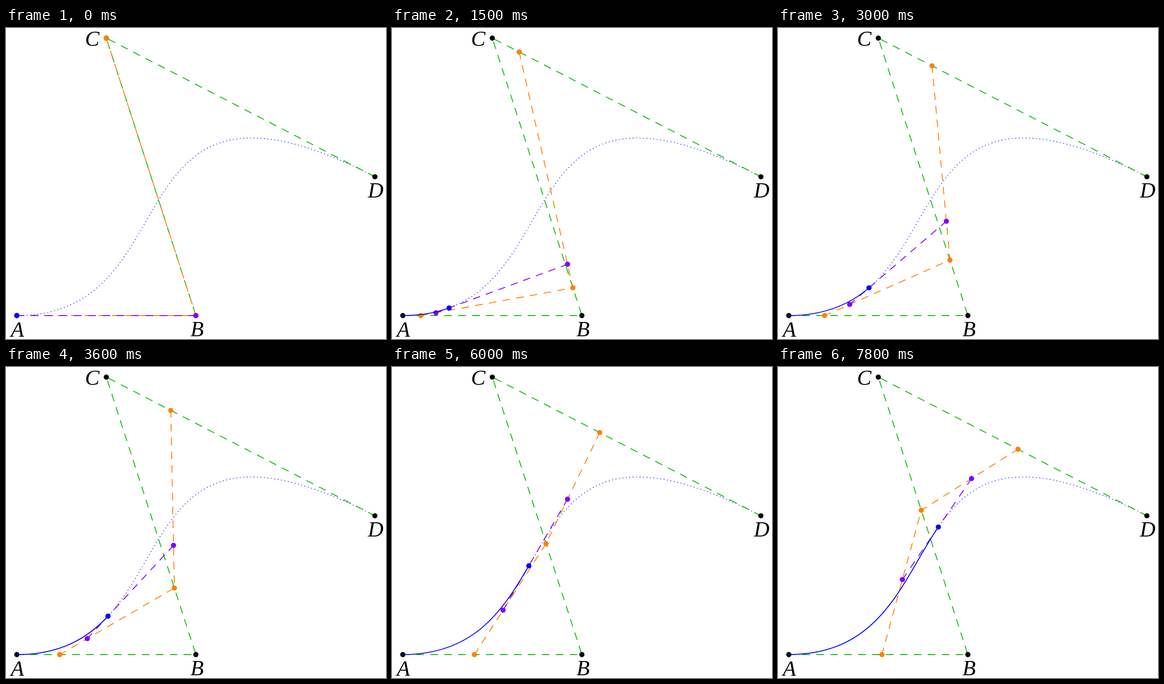
These frames come from a looping animation (827 px wide and 677 px high, 8000 ms). An HTML page:

```html
<!DOCTYPE html>
<html lang="en">
<head>
<meta charset="utf-8">
<title>Cubic curve construction</title>
<style>
  html, body { margin: 0; width: 100%; height: 100%; overflow: hidden; background: #fff; }
  svg { display: block; width: 827px; height: 677px; }
  path { fill: none; stroke-width: 1.9; stroke-linecap: round; stroke-linejoin: round; }
  text { font: italic 47px "Liberation Serif", "Times New Roman", serif; }
</style>
</head>
<body>
<svg viewBox="0 0 827 677">
  <g id="art"></g>
  <text x="10.4" y="671.5">A</text>
  <text x="401.5" y="671">B</text>
  <text x="172" y="38.5">C</text>
  <text x="787.5" y="369">D</text>
</svg>
<script>
const LOOP = 8000, STEP = 300, DT = 0.02, DASH = 15.04, DOT_GAP = 7.52;
const GREEN = '#00bf00', ORANGE = '#ff8000', VIOLET = '#8000ff', BLUE = '#0000ff';
const corners = [[23.5, 626], [413.2, 626], [218.3, 22], [802.8, 323.8]];
const art = document.getElementById('art');

function add(tag, attrs) {
  const el = document.createElementNS('http://www.w3.org/2000/svg', tag);
  for (const k in attrs) el.setAttribute(k, attrs[k]);
  return art.appendChild(el);
}
const addPath = color => add('path', { stroke: color });
const addDots = (n, color) =>
  Array.from({ length: n }, () => add('circle', { r: 5.65, fill: color }));

const polyline = pts => 'M' + pts.join('L');
const cubic = ([a, b, c, d]) => `M${a}C${b} ${c} ${d}`;

// Stretch the pattern so that the path starts and ends with a full mark.
function setDashed(path, d, on, off) {
  path.setAttribute('d', d);
  const len = path.getTotalLength();
  const n = Math.max(1, Math.round((len - on) / (on + off)));
  const k = len / (n * (on + off) + on);
  path.setAttribute('stroke-dasharray', `${on * k} ${off * k}`);
}

function place(dots, pts) {
  dots.forEach((dot, i) => {
    dot.setAttribute('cx', pts[i][0]);
    dot.setAttribute('cy', pts[i][1]);
  });
}

// One de Casteljau level: a point on each side at fraction t.
const reduce = (pts, t) =>
  pts.slice(1).map((p, i) => p.map((v, j) => pts[i][j] + (v - pts[i][j]) * t));

setDashed(addPath(BLUE), cubic(corners), 0, DOT_GAP);
setDashed(addPath(GREEN), polyline(corners), DASH, DASH);
place(addDots(4, '#000'), corners);

const orangeLine = addPath(ORANGE), orangeDots = addDots(3, ORANGE);
const violetLine = addPath(VIOLET), violetDots = addDots(2, VIOLET);
const trace = addPath(BLUE), tip = addDots(1, BLUE);

function draw(t) {
  const p = reduce(corners, t), q = reduce(p, t), r = reduce(q, t);
  setDashed(orangeLine, polyline(p), DASH, DASH);
  setDashed(violetLine, polyline(q), DASH, DASH);
  place(orangeDots, p);
  place(violetDots, q);
  place(tip, r);
  trace.setAttribute('d', t ? cubic([corners[0], p[0], q[0], r[0]]) : '');
}

let shown = -1;
const start = performance.now();
function tick() {
  const step = Math.floor((performance.now() - start) % LOOP / STEP);
  if (step !== shown) draw((shown = step) * DT);
  requestAnimationFrame(tick);
}
tick();
</script>
</body>
</html>
```
